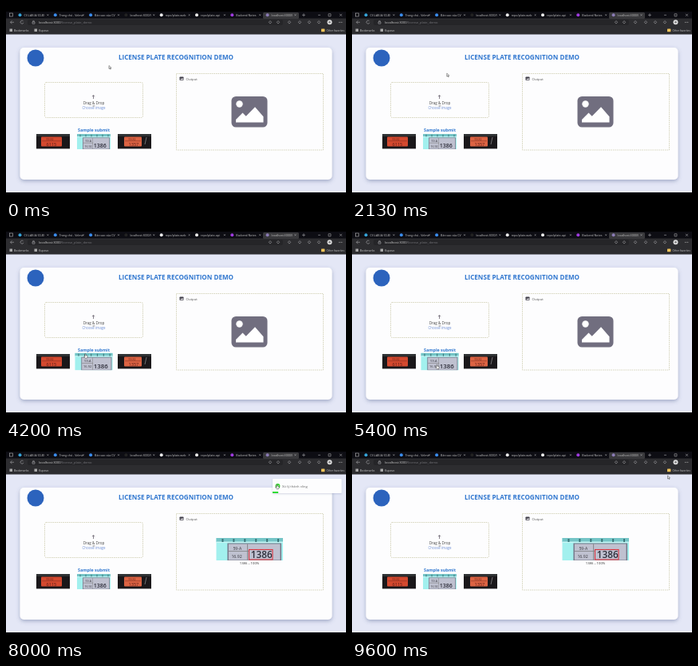
Recreate the animation shown at these times as an HTML page. Size 426 by 240 pixels, loop 9.67 s.

```html
<!DOCTYPE html>
<html lang="en">
<head>
<meta charset="utf-8">
<title>License plate recognition demo</title>
<style>
  html, body { margin: 0; width: 100%; height: 100%; overflow: hidden; background: #000; }
  svg { display: block; width: 100vw; height: 100vh; }
  text { font-family: "Open Sans", "Noto Sans", sans-serif; }
  .dash { fill: none; stroke: #c6c4a2; stroke-width: .7; stroke-dasharray: 1.6 1; }
  .line { fill: none; stroke: #a9a9ad; stroke-width: .6; }
  .heading { fill: #2f76cf; font-weight: 700; text-anchor: middle; }
  .mid { text-anchor: middle; }
</style>
</head>
<body>
<svg viewBox="0 0 426 240">
  <defs>
    <filter id="shadow" x="-10%" y="-20%" width="120%" height="150%">
      <feDropShadow dx="0" dy="2" stdDeviation="2.5" flood-color="#52628f" flood-opacity=".45"/>
    </filter>
    <filter id="soft" x="-10%" y="-20%" width="120%" height="160%">
      <feDropShadow dx="0" dy="1" stdDeviation="1.2" flood-color="#52628f" flood-opacity=".25"/>
    </filter>
    <clipPath id="screen"><rect y="7" width="426" height="226"/></clipPath>
  </defs>
  <g clip-path="url(#screen)">
    <rect y="35" width="426" height="198" fill="#e4e7f6"/>
    <rect y="7" width="426" height="9" fill="#0d0d13"/>
    <rect y="15.5" width="426" height="20" fill="#2d2d30"/>
    <rect x="27" y="17" width="320" height="7" rx="2" fill="#252528"/>
    <g id="chrome"></g>

    <rect x="17.5" y="52" width="391" height="165" rx="5" fill="#fdfdfe" filter="url(#shadow)"/>
    <circle cx="37" cy="65" r="10.5" fill="#2c63bd"/>
    <text class="heading" x="213" y="66.8" font-size="8.1">LICENSE PLATE RECOGNITION DEMO</text>

    <rect class="dash" x="48.5" y="95.5" width="123" height="44" rx="2"/>
    <path d="M109.5 116v-4.4m-1.5 1.5 1.5-1.5 1.5 1.5" fill="none" stroke="#66606c" stroke-width=".8"/>
    <text class="mid" x="110" y="122.6" font-size="4.6" fill="#444">Drag &amp; Drop</text>
    <text class="mid" x="110" y="126" font-size="3.2" fill="#555">or</text>
    <text class="mid" x="110" y="129.4" font-size="4.4" fill="#6d8fd6">Choose image</text>
    <text class="heading" x="110" y="157" font-size="5.4">Sample submit</text>
    <g id="samples"></g>

    <rect class="dash" x="213.5" y="84.5" width="184" height="95.5"/>
    <rect x="217.5" y="88.5" width="5" height="4.4" rx=".7" fill="#45434e"/>
    <path d="M218.2 92.2l1.2-1.4.7.6 1-1.4 1 2.2z" fill="#fff"/>
    <text x="225.6" y="92.6" font-size="4.3" fill="#555">Output</text>

    <g id="placeholder">
      <rect x="282.5" y="113" width="45" height="38.5" rx="5.5" fill="#716e7f"/>
      <circle cx="292.5" cy="122.5" r="4.2" fill="#fff"/>
      <path d="M288 145.5v-3.5l8.5-8.5 4.2 4.2 11.3-11.5 10.5 12v7.3z" fill="#fff"/>
    </g>
    <g id="result">
      <text class="mid" x="305" y="147.9" font-size="4.2" fill="#333">1386 – 100%</text>
    </g>

    <g id="toast">
      <rect x="334" y="41" width="86.5" height="18" rx="1" fill="#fdfdfe" filter="url(#soft)"/>
      <circle cx="340.5" cy="50" r="2.9" fill="#35d82c"/>
      <path d="M339.1 50l1 1.1 1.8-2.1" fill="none" stroke="#fff" stroke-width=".7"/>
      <text x="346" y="51.5" font-size="4.1" fill="#666">Xử lý thành công</text>
      <rect id="bar" x="334" y="57" height="2" fill="#30dc35"/>
    </g>

    <g id="cursor" stroke="#333" stroke-width=".5" fill="#fff">
      <path id="arrow" d="M0 0v4l1-.9.7 1.5.7-.3-.7-1.5h1.3z"/>
      <path id="hand" d="M-.5 0q.5-.6 1 0v1.6l2 .5v2l-.6 1.1h-2.3l-1.5-2 .5-.5.9.7z"/>
    </g>
  </g>
</svg>
<script>
const $ = id => document.getElementById(id);
const SVG = "http://www.w3.org/2000/svg";

function add(parent, tag, attrs, label) {
  const node = document.createElementNS(SVG, tag);
  for (const key in attrs) node.setAttribute(key, attrs[key]);
  if (label) node.textContent = label;
  return parent.appendChild(node);
}
const rect = (g, x, y, width, height, fill, more) => add(g, "rect", { x, y, width, height, fill, ...more });
const dot = (g, cx, cy, r, fill) => add(g, "circle", { cx, cy, r, fill });
const line = (g, d) => add(g, "path", { d, class: "line" });
const label = (g, x, y, size, fill, words) => add(g, "text", { x, y, "font-size": size, fill }, words);

function drawChrome(g) {
  rect(g, 322, 8, 45, 8, "#39393c", { rx: 1.5 });
  rect(g, 4.5, 9, 4, 4, "none", { stroke: "#bbb", "stroke-width": .6 });
  const tabs = [
    ["CV-LAB AI (CLB)", "#35a3d8"], ["Trang chủ - Velmo", "#3a8df0"], ["Bản sao của CV", "#3a8df0"],
    ["localhost:3000/l", "#222"], ["repo/plate-web", "#eee"], ["repo/plate-api", "#eee"],
    ["Backend Notes", "#a03be0"], ["localhost:3000/l", "#8a7bb5"]
  ];
  tabs.forEach(([name, color], i) => {
    const x = 17.5 + i * 44.3;
    dot(g, x, 11.3, 2, color);
    label(g, x + 5, 12.6, 3.6, "#c9c9c9", name);
    line(g, `M${x + 34} 10.4l1.8 1.8m0-1.8l-1.8 1.8`);
  });
  line(g, "M371 11.3h4m-2-2v4M391 11.3h3M404 9.8h3v3h-3zM418 9.8l3 3m0-3l-3 3");
  line(g, "M10 20.3H5.5l2-2m-2 2 2 2M21.6 18.8a2 2 0 1 0 .4 2M33 20h3v2.2h-3zM33.7 20v-1.3h1.6V20");
  const url = label(g, 41, 21.8, 4.1, "#ccc", "localhost:3000");
  add(url, "tspan", { fill: "#77777c" }, "/license_plate_demo");
  for (const x of [331, 341, 355, 368, 380, 392])
    line(g, `M${x - 1.7} 20.3l1.7-1.8 1.7 1.8-1.7 1.8z`);
  dot(g, 405.5, 20.3, 3, "#ddd");
  dot(g, 405.5, 20.3, 1.2, "#777");
  for (const x of [417.5, 419.2, 420.9]) dot(g, x, 20.3, .5, "#bbb");
  rect(g, 4.5, 28.5, 3.5, 3.5, "#aaa");
  label(g, 10, 31.6, 3.5, "#ccc", "Bookmarks");
  rect(g, 35.5, 28.5, 3.5, 3.5, "#aaa");
  label(g, 41, 31.6, 3.5, "#ccc", "Kupavo");
  rect(g, 395, 28.6, 4.4, 3.6, "#f0c45a", { rx: .5 });
  label(g, 401.5, 31.6, 3.2, "#ccc", "Other favorites");
}

// Dark photo with a glowing orange plate.
function orangePlate(g, x, px, width, fill, digits) {
  rect(g, x, 160, 42, 18.4, "#1a171a");
  rect(g, x, 160, 42, 3, "#2f3234");
  rect(g, px, 163.5, width, 12, fill, { rx: 1 });
  rect(g, px + 1, 168.6, width - 2, .5, "#7a2c20");
  label(g, px + width * .25, 168, 3.4, "#5c1f18", "59-X2");
  label(g, px + width * .25, 174.6, 5.6, "#5c1f18", digits);
}

// Cyan photo with a pale plate, drawn on an 84 by 28 layout.
function palePlate(g, x, y, w, h, digits) {
  const u = w / 84, v = h / 28;
  const part = (a, b, c, d, fill) => rect(g, x + a * u, y + b * v, c * u, d * v, fill);
  part(0, 0, 84, 28, "#a2f0ee");
  part(0, 0, 84, 5, "#74c4c6");
  part(0, 4.6, 84, 1.2, "#d2fafa");
  for (let i = 0; i < 6; i++) part(7 + i * 14, 1, 2, 4, "#3c7679");
  part(14, 6.5, 68, 21.5, "#77798a");
  part(15.5, 7.5, 65, 20, "#bfc1d0");
  part(15.5, 16, 25, .7, "#777");
  part(39, 7.5, .8, 20, "#777");
  label(g, x + 21 * u, y + 14.5 * v, 5.2 * v, "#3a3a40", "59-A");
  label(g, x + 19 * u, y + 24.5 * v, 5.2 * v, "#3a3a40", "16.92");
  const [dx, dy, size] = digits;
  add(g, "text", { x: dx, y: dy, "font-size": size, "font-weight": 600, fill: "#2e2e3a" }, "1386");
}

drawChrome($("chrome"));
orangePlate($("samples"), 38, 44, 26, "#d4492f", "6115");
orangePlate($("samples"), 140, 148, 22, "#dc6343", "1357");
line($("samples"), "M174 173l2-9");
const hovered = add($("samples"), "g", {});
palePlate(hovered, 89, 160, 42, 19, [109.8, 176.8, 7]);
palePlate($("result"), 263.5, 115, 83.5, 28, [306.8, 140.2, 11.8]);
rect($("result"), 304.5, 129.5, 29.5, 12.5, "none", { stroke: "#d93640", "stroke-width": 1.1 });

const LOOP = 9670;
const DONE = 5760;
const CLOSE = 8250;
const path = [
  [0, 129, 74.5], [1900, 129, 74.5], [2700, 79.5, 121.5], [3400, 79.5, 121.5], [4600, 106.5, 173.5],
  [5700, 106.5, 173.5], [6500, 215.5, 108.5], [7000, 215.5, 108.5], [7900, 339.5, 48.5],
  [8400, 339.5, 48.5], [9200, 395.5, 37], [LOOP, 395.5, 37]
];
const clamp = x => Math.min(1, Math.max(0, x));
const ease = x => x * x * (3 - 2 * x);

function cursorAt(t) {
  const i = path.findIndex(([end]) => end > t);
  const [t0, x0, y0] = path[i - 1], [t1, x1, y1] = path[i];
  const k = ease((t - t0) / (t1 - t0));
  return [x0 + (x1 - x0) * k, y0 + (y1 - y0) * k];
}
const show = (id, on) => $(id).style.display = on ? "" : "none";

function draw(now) {
  const t = Math.floor((now % LOOP) * .015 + .05) / .015;
  const [x, y] = cursorAt(Math.min(t, LOOP - 1));
  const inside = (left, top, right, bottom) => x > left && x < right && y > top && y < bottom;
  const overSample = inside(89, 160, 131, 179);
  const clickable = overSample || inside(48, 95, 171, 139) || (t < CLOSE && inside(334, 41, 421, 59));
  $("cursor").setAttribute("transform", `translate(${x} ${y})`);
  show("arrow", !clickable);
  show("hand", clickable);
  hovered.setAttribute("transform", overSample ? "translate(110 169.5) scale(1.12) translate(-110 -169.5)" : "");

  show("placeholder", t < DONE);
  show("result", t >= DONE);
  show("toast", t >= DONE && t < CLOSE + 300);
  const slide = (1 - ease(clamp((t - DONE) / 270))) + ease(clamp((t - CLOSE) / 270));
  $("toast").setAttribute("transform", `translate(${slide * 95} 0)`);
  $("bar").setAttribute("width", 87 * clamp(1 - (t - DONE) / 2440));
}

const start = performance.now();
function tick() {
  draw(performance.now() - start);
  requestAnimationFrame(tick);
}
tick();
</script>
</body>
</html>
```
